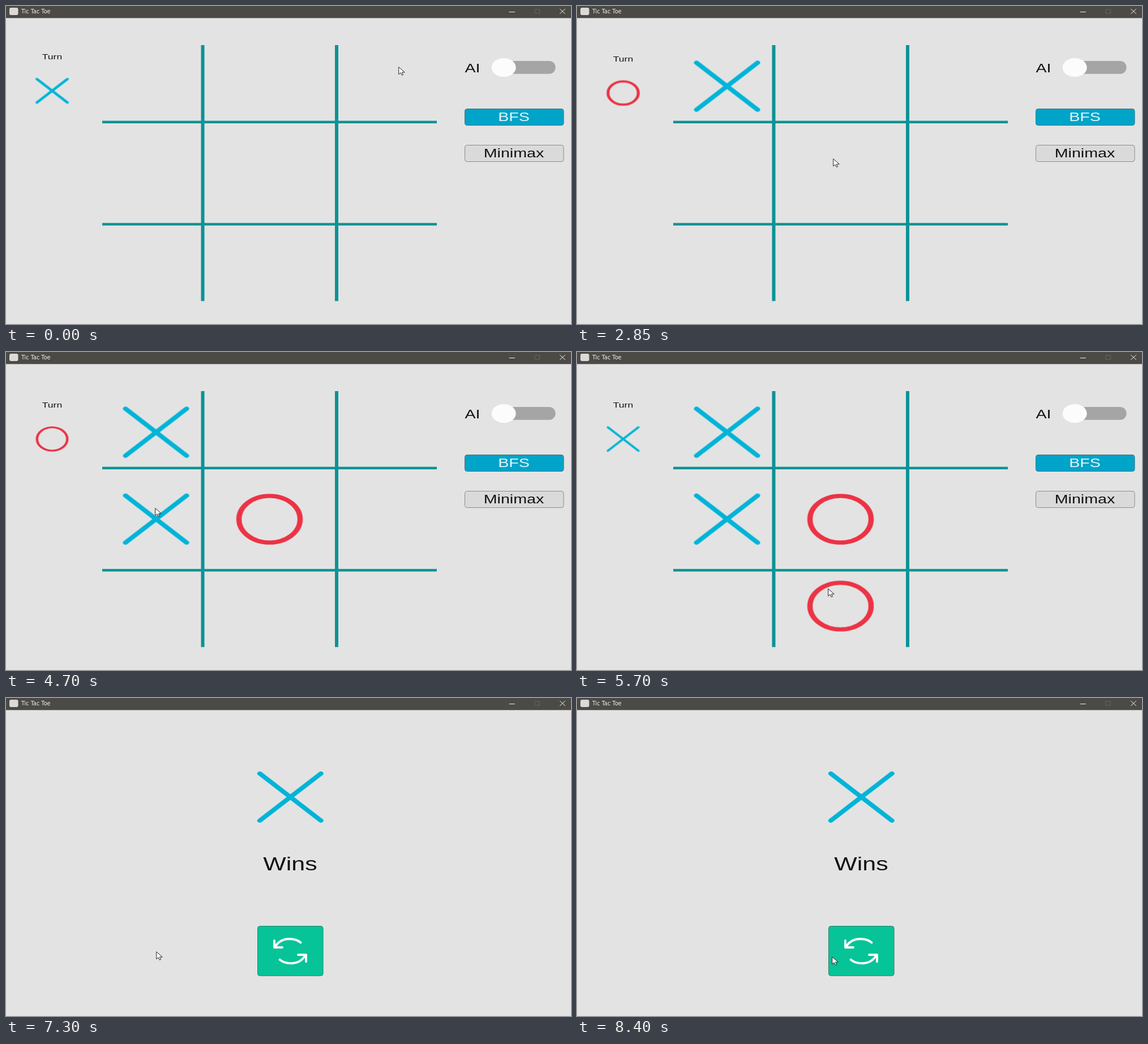
Animation of 998x561 px, one loop 8450 ms. Source, as an HTML page:

```html
<!DOCTYPE html>
<html lang="en">
<head>
<meta charset="utf-8">
<title>Tic Tac Toe</title>
<style>
  html, body { margin: 0; width: 100%; height: 100%; overflow: hidden; background: #e3e3e3; }
  svg { display: block; width: 998px; height: 561px; }
  text { font-family: "Liberation Sans", Arial, sans-serif; font-size: 22px; text-anchor: middle; fill: #111; }
  .title { font: 9.7px "DejaVu Sans", sans-serif; text-anchor: start; fill: #f4f4f2; }
  .line { fill: none; stroke-linecap: round; stroke-linejoin: round; }
  .x { fill: none; stroke: #00b4d8; stroke-linecap: round; }
  .o { fill: none; stroke: #ec3345; }
  .mark { stroke-width: 7.2px; }

  .anim { animation: 8450ms step-end infinite; }
  #game { animation-name: game; }
  #win { animation-name: win; }
  #turn { animation-name: turn; }
  #turnX { animation-name: turnX; }
  #turnO { animation-name: turnO; }
  #m1 { animation-name: m1; }
  #m2 { animation-name: m2; }
  #m3 { animation-name: m3; }
  #m4 { animation-name: m4; }
  #m5 { animation-name: m5; }
  #cursor { animation-name: cursor; }

  @keyframes m1 { 0% { opacity: 0 } 21.893%, to { opacity: 1 } }
  @keyframes m2 { 0% { opacity: 0 } 37.869%, to { opacity: 1 } }
  @keyframes m3 { 0% { opacity: 0 } 55.621%, to { opacity: 1 } }
  @keyframes m4 { 0% { opacity: 0 } 65.68%, to { opacity: 1 } }
  @keyframes m5 { 0% { opacity: 0 } 76.923%, to { opacity: 1 } }
  @keyframes game { 0% { opacity: 1 } 78.698%, to { opacity: 0 } }
  @keyframes win { 0% { opacity: 0 } 78.698%, to { opacity: 1 } }

  @keyframes turn {
    0% { transform: translateY(0); stroke-width: 8px }
    21.893% { transform: translateY(4px); stroke-width: 8px }
    55.621%, to { transform: translateY(4px); stroke-width: 6.8px }
  }
  @keyframes turnX {
    0%, 37.869%, 65.68% { opacity: 1 }
    21.893%, 55.621%, 76.923%, to { opacity: 0 }
  }
  @keyframes turnO {
    0%, 37.869%, 65.68% { opacity: 0 }
    21.893%, 55.621%, 76.923%, to { opacity: 1 }
  }

  /* the pointer advances every 50 ms */
  @keyframes cursor {
    0% { transform: translate(693px, 107px) }
    1.183% { transform: translate(693px, 107px); animation-timing-function: steps(5, start) }
    4.142% { transform: translate(565px, 139px); animation-timing-function: steps(5, start) }
    7.1% { transform: translate(375px, 153px); animation-timing-function: steps(5, start) }
    10.059% { transform: translate(271px, 140px) }
    11.242% { transform: translate(271px, 140px); animation-timing-function: steps(2, start) }
    12.426% { transform: translate(269px, 142px) }
    14.201% { transform: translate(269.5px, 141px) }
    25.443% { transform: translate(269.5px, 141px); animation-timing-function: steps(3, start) }
    27.218% { transform: translate(278px, 165px) }
    29.585% { transform: translate(278px, 165px); animation-timing-function: steps(8, start) }
    34.319% { transform: translate(452px, 269px); animation-timing-function: steps(2, start) }
    35.502% { transform: translate(462px, 313px) }
    43.786% { transform: translate(462px, 313px); animation-timing-function: steps(7, start) }
    47.928% { transform: translate(350px, 294px); animation-timing-function: steps(7, start) }
    52.071% { transform: translate(256px, 280px) }
    53.254% { transform: translate(263px, 275px) }
    57.396% { transform: translate(263px, 275px); animation-timing-function: steps(11, start) }
    63.905% { transform: translate(443px, 417px) }
    68.047% { transform: translate(443px, 417px); animation-timing-function: steps(6, start) }
    71.597% { transform: translate(262px, 441px) }
    73.372% { transform: translate(259px, 445px) }
    86.39% { transform: translate(265px, 447px) }
    86.982% { transform: translate(265px, 447px); animation-timing-function: steps(14, start) }
    95.266% { transform: translate(416px, 459px) }
    97.041% { transform: translate(416px, 459px); animation-timing-function: steps(5, start) }
    to { transform: translate(450px, 456px) }
  }
</style>
</head>
<body>
<svg viewBox="0 0 998 561">
  <defs>
    <path id="cross" d="M-41.5-41.5 41.5 41.5M41.5-41.5-41.5 41.5"/>
    <circle id="ring" r="41.2"/>
    <path id="arrow" d="M474 428V440H488M476 438Q484 425 501 425 513 425 520.500 431.500"/>
  </defs>

  <rect width="998" height="561" fill="#e3e3e3"/>

  <g id="game" class="anim">
    <g id="turn" class="anim">
      <text transform="translate(81.500 94) scale(1.300 1)" style="font-size:13.500px">Turn</text>
      <g transform="translate(81.500 149.500) scale(.65 .5)">
        <g id="turnX" class="anim"><use href="#cross" class="x"/></g>
        <g id="turnO" class="anim"><use href="#ring" class="o"/></g>
      </g>
    </g>

    <path d="M347.500 69V520.500M584 69V520.500" stroke="#0a9396" stroke-width="6"/>
    <path d="M170 204.700H761M170 385H761" stroke="#0a9396" stroke-width="4.600"/>

    <g class="mark">
      <g id="m1" class="anim"><use href="#cross" class="x" transform="translate(265 141.500) scale(1.300 1)"/></g>
      <g id="m2" class="anim"><use href="#ring" class="o" transform="translate(465.500 295) scale(1.310 1)"/></g>
      <g id="m3" class="anim"><use href="#cross" class="x" transform="translate(265 294.700) scale(1.300 1)"/></g>
      <g id="m4" class="anim"><use href="#ring" class="o" transform="translate(465.500 448.200) scale(1.310 1)"/></g>
      <g id="m5" class="anim"><use href="#cross" class="x" transform="translate(265 448) scale(1.300 1)"/></g>
    </g>

    <text transform="translate(824 116.500) scale(1.300 1)">AI</text>
    <rect x="868" y="97" width="102.500" height="22.700" rx="11" fill="#a5a5a5"/>
    <ellipse cx="879.200" cy="108.500" rx="21.500" ry="16.500" fill="#fcfcfc"/>

    <rect x="810.500" y="181.500" width="174.500" height="29" rx="4" fill="#00a4c9" stroke="#3b7482"/>
    <text transform="translate(897 203.300) scale(1.300 1)" style="fill:#e6f6fa">BFS</text>
    <rect x="810.500" y="245.500" width="174.500" height="29" rx="4" fill="#dadada" stroke="#8c8c8c"/>
    <text transform="translate(897 267.300) scale(1.300 1)">Minimax</text>
  </g>

  <g id="win" class="anim">
    <use href="#cross" class="x mark" transform="translate(502.300 174.700) scale(1.300 1)"/>
    <text transform="translate(502 304) scale(1.300 1)" style="font-size:33px">Wins</text>
    <rect x="444.500" y="402.500" width="115.500" height="87.500" rx="4" fill="#06c498" stroke="#2f7a66"/>
    <g class="line" stroke="#fff" stroke-width="3.800">
      <use href="#arrow"/>
      <use href="#arrow" transform="rotate(180 502 446.500)"/>
    </g>
  </g>

  <rect width="998" height="21.300" fill="#4c4a45"/>
  <rect x="6" y="3" width="15.500" height="13" rx="3" fill="#dcd9d9"/>
  <text class="title" x="27" y="13.200">Tic Tac Toe</text>
  <g class="line" stroke="#f0f0ee">
    <path d="M889 10.500H898.500M978.500 5.500 987.500 13.500M987.500 5.500 978.500 13.500"/>
    <path d="M934.500 6H942.500V13H934.500Z" stroke="#68665f"/>
  </g>

  <g id="cursor" class="anim">
    <path d="M.7.7V13.500L4 10.700 6.300 15.200 8.500 14.300 6.400 10H11.300Z" fill="#fff" stroke="#222" stroke-width="1"/>
  </g>
</svg>
</body>
</html>
```
